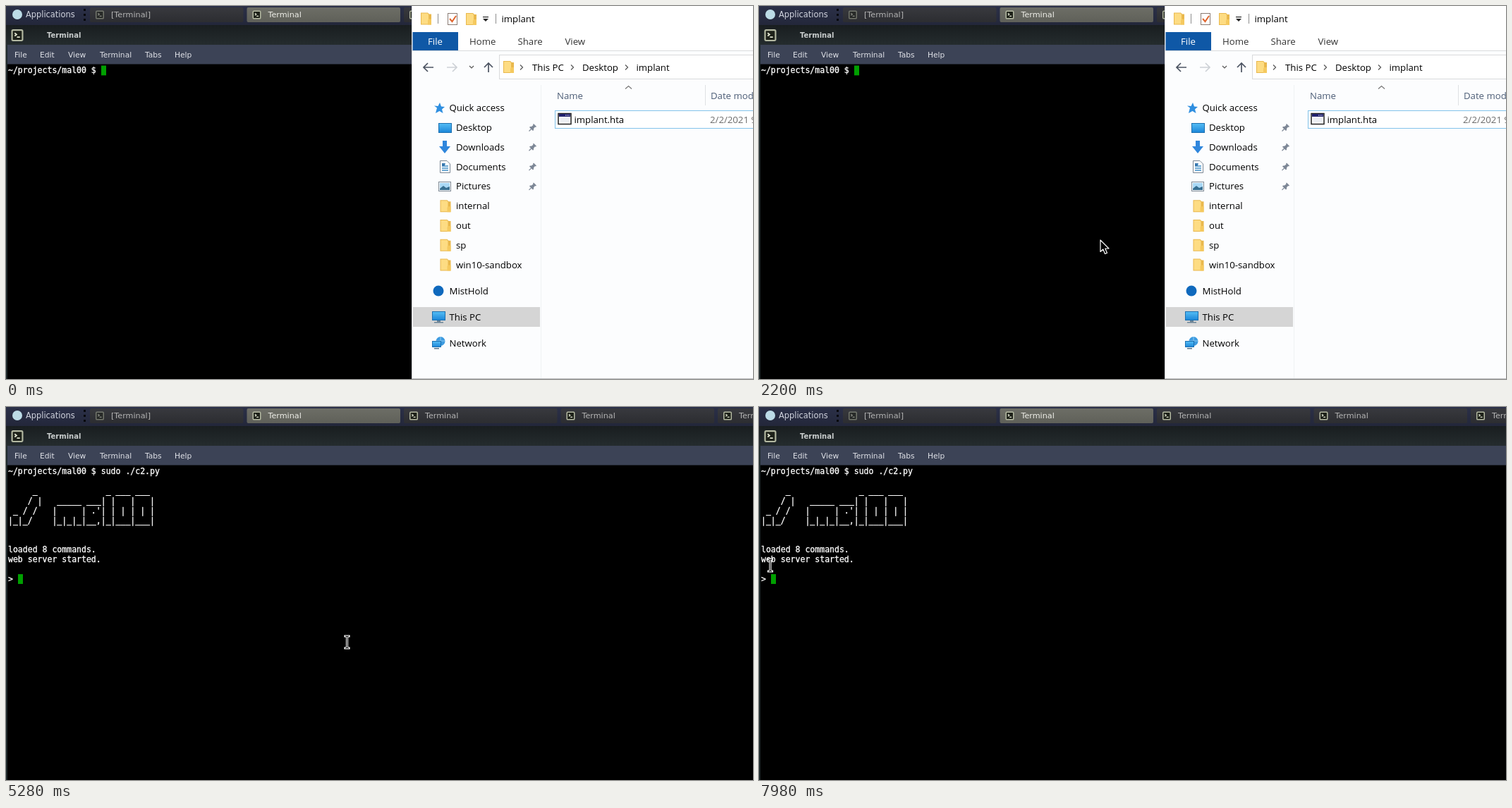
An HTML page for the animation above (8 s loop, 1059x529 px).

```html
<!DOCTYPE html>
<html lang="en">
<head>
<meta charset="utf-8">
<title>Terminal session</title>
<style>
  html, body { margin: 0; width: 100%; height: 100%; overflow: hidden; background: #000; }
  svg { display: block; width: 100vw; height: 100vh; }
  text { white-space: pre; }
  .ui { font-family: "DejaVu Sans", sans-serif; }
  .mono { font: 11.52px "DejaVu Sans Mono", monospace; fill: #fff; stroke: #fff; stroke-width: .3px; }
  .win { font: 13.2px "Open Sans", sans-serif; fill: #000; }
</style>
</head>
<body>
<svg id="stage" viewBox="0 0 1059 529" preserveAspectRatio="none"></svg>
<script>
const LOOP = 8000;
const COL = 6.935, ROW = 13.87, LEFT = 3, BASE = 95.2;
const PROMPT = '~/projects/mal00 $ ';
const COMMAND = 'sudo ./c2.py';
const BANNER = [
  '     _              _ ___ ___',
  '    / |   _____ ___| |   |   |',
  " _ / /   |     | .'| | | | | |",
  '|_|_/    |_|_|_|__,|_|___|___|'
];
const T = {
  arrowIn: 960, arrowStop: 1640, raise: 2340,
  type: 3330, key: 66, enter: 4200, banner: 4340, server: 4620,
  leave: 6520, near: 7420, rest: 7800
};

const rect = (x, y, w, h, fill, extra = '') =>
  `<rect x="${x}" y="${y}" width="${w}" height="${h}" fill="${fill}" ${extra}/>`;
const line = (d, stroke, w = 1, extra = '') =>
  `<path d="${d}" fill="none" stroke="${stroke}" stroke-width="${w}" ${extra}/>`;
const shape = (d, fill, extra = '') => `<path d="${d}" fill="${fill}" ${extra}/>`;
const circle = (x, y, r, fill) => `<circle cx="${x}" cy="${y}" r="${r}" fill="${fill}"/>`;
const at = (x, y, body, extra = '') => `<g transform="translate(${x} ${y})" ${extra}>${body}</g>`;
const ui = (x, y, s, size, fill, extra = '') =>
  `<text class="ui" x="${x}" y="${y}" font-size="${size}" fill="${fill}" ${extra}>${s}</text>`;
const win = (x, y, s, fill = '#000') =>
  `<text class="win" x="${x}" y="${y}" style="fill:${fill}">${s}</text>`;

// Desktop panel and terminal window
const shellIcon = (x, y, s, opacity = 1) => at(x, y,
  `<g transform="scale(${s / 16})">` +
  rect(1, 1, 14, 14, '#1d2119', 'rx="1.5" stroke="#b4b9a2" stroke-width="2"') +
  line('M4.500 5L7 7L4.500 9M7.500 10.500H11.500', '#dfe3cf', 1.7) + '</g>', `opacity="${opacity}"`);

function panel() {
  let s = rect(0, 0, 1059, 27, 'url(#bar)') + circle(16, 12, 7, '#bcdbe6') +
    ui(28, 16, 'Applications', 11.4, '#d3d6e0');
  for (const y of [4, 11, 18]) s += rect(110, y, 3, 3, '#07080c');
  for (let i = 0; i < 5; i++) {
    const x = 119.5 + 222.5 * i, active = i === 1;
    s += rect(x - .5, 2, 217.5, 21, active ? 'url(#active)' : 'url(#button)', 'rx="2"');
    s += shellIcon(x + 7.5, 6.5, 12, i ? 1 : .5);
    s += ui(x + 29.5, 16, i ? 'Terminal' : '[Terminal]', 11.2, active ? '#f0f0ea' : '#b5b5b5');
  }
  return s;
}

function terminal() {
  let s = rect(0, 27, 1059, 502, '#1f2a2c') + rect(0, 27, 1059, 29, 'url(#title)') +
    shellIcon(7.5, 33, 17) + ui(58, 45, 'Terminal', 10, '#c9cdcd', 'font-weight="bold"') +
    rect(2, 55, 1057, 28, '#3c4356') + rect(2, 82.5, 1057, 446.5, '#000');
  const menu = { File: 12, Edit: 48, View: 88, Terminal: 133, Tabs: 197, Help: 239 };
  for (const name in menu) s += ui(menu[name], 73, name, 10.7, '#dfe1e7');
  return s;
}

// File manager
const folder = (x, y) => at(x, y,
  shape('M0 1H10L12 3H15V18H0Z', '#e9b84d') + shape('M1 2H10L11 4V17H1Z', '#fddc83') +
  shape('M11 10H15V18H10V12Z', '#f5c95f'));

const pin = y => at(747, y,
  shape('M1-5L5-1L4 0L3-.5L1 2V4L0 5L-5 0L-4-1H-2L.500-3L0-4Z', '#7d8796') +
  line('M-2 2L-5.500 5.500', '#7d8796', 1.3));

const monitor = (x, y, w, h) =>
  rect(x + .5, y + .5, w - 1, h - 1, 'url(#screen)', 'stroke="#1b6fb0"');

const sheet = at(615, 219,
  shape('M.5.5H10L14.500 5V17.500H.5Z', '#fff', 'stroke="#7b8794"') +
  line('M3 5H8M3 8H12M3 11H12M3 14H12', '#3f8fc8', 1.4) + rect(3, 4, 4, 4, '#3a79b0'));

const picture = at(613, 249,
  rect(.5, .5, 17, 13, '#f5f8fa', 'stroke="#818c97"') + rect(2, 2, 14, 10, '#a9d8f5') +
  shape('M2 10L7 6L11 9L16 7V12H2Z', '#376f91'));

function sidebar() {
  let s = at(614, 145, shape('M1-8L3-2.500L8-2L4 1.500L5.500 7L.5 4L-5 7L-3-.5L-7-3.500L-1.500-3Z', '#2f8fe0'));
  s += win(628.5, 149, 'Quick access');
  s += monitor(613, 166, 19, 14) + shape('M619 191H625V199H630L622 209L614 199H619Z', '#2f86dc') + sheet + picture;
  ['Desktop', 'Downloads', 'Documents', 'Pictures', 'internal', 'out', 'sp', 'win10-sandbox']
    .forEach((name, i) => {
      const y = 172 + 27.8 * i;
      s += win(638, y + 5, name) + (i < 4 ? pin(y) : folder(615.5, y - 9));
    });
  s += circle(613, 404, 7.5, '#0f69bd') + win(628.5, 408.5, 'MistHold');
  s += rect(577, 427, 180, 28, '#d5d5d5') + monitor(604, 433, 19, 13) +
    rect(611, 446, 5, 2, '#6d8496') + rect(607, 448, 13, 1.5, '#6d8496') + win(628.5, 445.5, 'This PC');
  s += circle(616, 475.5, 6.5, '#3d9be0') + line('M616 469V482M610 475H622', '#8fcaf0') +
    monitor(604, 475, 13, 9) + rect(607, 485, 7, 1.5, '#55728a') + win(628.5, 483, 'Network');
  return s;
}

function explorer() {
  const chevron = x => line(`M${x - 2} 83.500L${x + 1.5} 87L${x - 2} 90.500`, '#555', 1.2);
  const rule = (x, y, h) => rect(x, y, 1, h, '#8d8d8d');
  let s = rect(575, 0, 484, 529, '#fcfdfe') + rect(576, 0, 483, 63, '#fff') + rect(575, 0, 1, 529, '#d9dce0');

  s += folder(588, 8.5) + rule(612, 11, 14);
  s += rect(626.5, 10.5, 13, 16, '#fff', 'stroke="#8a7b74"') + line('M629 18L632.500 22L638 14', '#e0642d', 2);
  s += folder(652, 9) + rect(676, 15, 8, 1.2, '#222') + shape('M676 18H684L680 22Z', '#222');
  s += rule(694, 11, 14) + win(702.5, 23, 'implant');

  s += rect(576.5, 37, 64.5, 26, '#0f58a6') + win(598, 54.5, 'File', '#fff') +
    win(657, 54.5, 'Home', '#333') + win(725.5, 54.5, 'Share', '#333') + win(792.5, 54.5, 'View', '#333') +
    rect(576, 63, 483, 1, '#dadbdc');

  s += line('M606 87H592M598 81L592 87L598 93', '#4b5361', 1.7);
  s += line('M625 87H639M633 81L639 87L633 93', '#cdd1d6', 1.7);
  s += line('M657 85L660 88L663 85', '#555', 1.2);
  s += line('M684 94V81M678 87L684 81L690 87', '#4b5361', 1.7);
  s += rect(699.5, 69.5, 370, 34, '#fff', 'stroke="#d9dadc"') + folder(705, 77);
  s += [731, 803, 880].map(chevron).join('') +
    win(746, 91.5, 'This PC') + win(817, 91.5, 'Desktop') + win(893.5, 91.5, 'implant');

  s += line('M878 117.500L882.500 113.500L887 117.500', '#777', 1.2) + rect(991, 112, 1, 29, '#dfe1e4') +
    win(781, 132, 'Name', '#4c5d76') + win(999, 132, 'Date modified', '#4c5d76');
  s += rect(778.5, 148.5, 300, 25, '#fff', 'stroke="#83c3ea"') + win(805.5, 165.5, 'implant.hta') +
    win(998, 165.5, '2/2/2021 9:41 PM', '#6d6d6d');
  s += rect(783, 152.5, 18, 15, '#fff', 'stroke="#222" stroke-width="1.5"') + rect(784, 153, 16, 4, '#23236f') +
    line('M793 155H799', '#fff', 1.2, 'stroke-dasharray="1.2 1"') + rect(785.5, 158.5, 13, 7, '#eceef2');

  return s + rect(758, 112, 1, 416, '#f0f2f4') + sidebar() + rect(575, 528, 484, 1, '#b9bbbd');
}

const gradient = (id, a, b) =>
  `<linearGradient id="${id}" x2="0" y2="1"><stop stop-color="${a}"/><stop offset="1" stop-color="${b}"/></linearGradient>`;
const arrow = shape('M0 0V16.500L3.800 13L6.500 19.500L9.500 18.200L6.800 12H12Z', '#000',
  'stroke="#fff" stroke-width="1.2" stroke-linejoin="round"');
const beamPath = 'M-2.500-8.500H-1L0-7.500L1-8.500H2.500M0-7.500V7.500M-2.500 8.500H-1L0 7.500L1 8.500H2.500';
const beam = line(beamPath, '#fff', 3.2, 'stroke-linecap="square"') + line(beamPath, '#000', 1.1);

const stage = document.getElementById('stage');
stage.innerHTML = '<defs>' +
  gradient('bar', '#2b3048', '#23273a') + gradient('button', '#38393e', '#2c2d31') +
  gradient('active', '#6d6e66', '#5f6059') + gradient('title', '#191e20', '#252c2e') +
  gradient('screen', '#55bdf5', '#1b86d8') + '</defs>' +
  panel() + terminal() + '<g id="lines"></g>' +
  `<rect id="block" width="7" height="${ROW}" fill="#00a000"/>` +
  `<g id="explorer">${explorer()}</g><g id="arrow">${arrow}</g><g id="beam">${beam}</g>`;

const [lines, block, files, arrowEl, beamEl] =
  ['lines', 'block', 'explorer', 'arrow', 'beam'].map(id => document.getElementById(id));
const rows = Array.from({ length: 12 }, (_, i) => {
  const el = document.createElementNS('http://www.w3.org/2000/svg', 'text');
  el.setAttribute('class', 'mono');
  el.setAttribute('x', LEFT);
  el.setAttribute('y', Math.round(BASE + ROW * i));
  return lines.appendChild(el);
});

const clamp = v => Math.min(1, Math.max(0, v));
const smooth = v => v * v * (3 - 2 * v);
const mix = (a, b, k) => a + (b - a) * k;
const progress = (t, a, b) => smooth(clamp((t - a) / (b - a)));
const show = (el, on) => el.setAttribute('visibility', on ? 'visible' : 'hidden');
const place = (el, x, y) => el.setAttribute('transform', `translate(${x} ${y})`);

function screenText(t) {
  const typed = Math.floor(clamp((t - T.type) / (T.key * COMMAND.length)) * COMMAND.length);
  const out = [PROMPT + COMMAND.slice(0, typed)];
  if (t >= T.banner) {
    out.push('', ...BANNER, '', '', 'loaded 8 commands.');
    if (t >= T.server) out.push('web server started.');
    out.push('', '> ');
  } else if (t >= T.enter) out.push('');
  return out;
}

function draw(t) {
  const out = screenText(t), last = out.length - 1;
  rows.forEach((el, i) => {
    const s = out[i] || '';
    if (el.textContent !== s) el.textContent = s;
  });
  block.setAttribute('x', Math.round(LEFT + COL * out[last].length));
  block.setAttribute('y', BASE - 10.7 + ROW * last);

  const raised = t >= T.raise;
  show(files, !raised);
  show(arrowEl, t >= T.arrowIn && !raised);
  show(beamEl, raised);

  const a = progress(t, T.arrowIn, T.arrowStop);
  place(arrowEl, mix(745.7, 484, a), mix(523.4, 332, a));
  const b = progress(t, T.leave, T.near), c = progress(t, T.near, T.rest);
  place(beamEl, mix(mix(483.5, 28, b), 16, c), mix(mix(333.5, 237, b), 224.5, c));
}

function tick() {
  draw(performance.now() % LOOP);
  requestAnimationFrame(tick);
}
tick();
</script>
</body>
</html>
```
